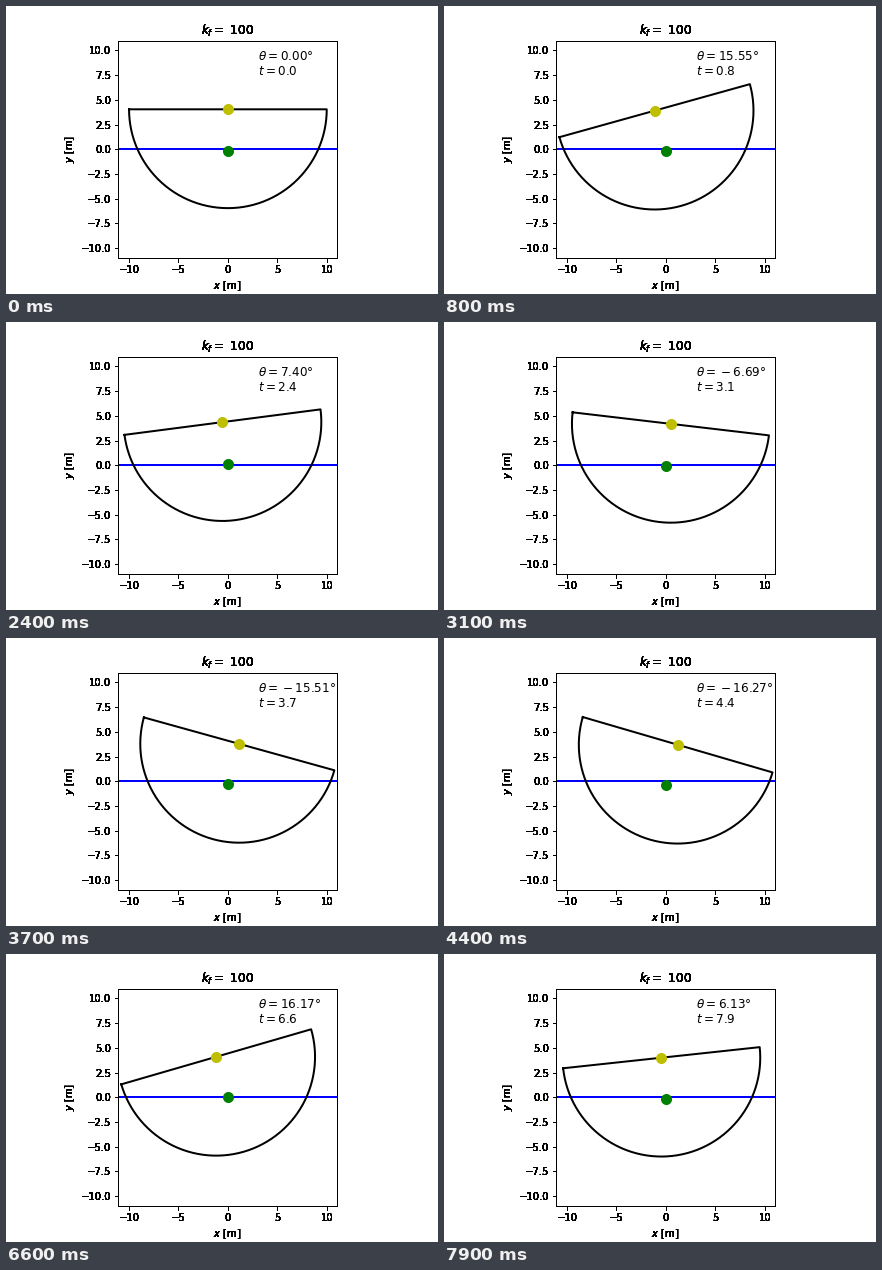
Animation of 432 by 288 pixels, one loop 8 s. Source, as a matplotlib script:

```python
import numpy as np
import matplotlib.pyplot as plt
from matplotlib.animation import FuncAnimation

# Half cylinder floating on water
R = 10.0                                   # radius
C = 4 * R / (3 * np.pi)                    # circle centre to centre of mass
G = 9.81
AREA = np.pi * R**2 / 2
INERTIA = R**2 / 2 - C**2                  # per unit mass
DENSITY = 0.5                              # relative to water
ROLL_DAMP, HEAVE_DAMP = 0.052, 0.03

FRAMES, DT, SUBSTEPS = 80, 0.1, 10


def lift(height):
    """Buoyancy per unit mass with the circle centre at this height."""
    wet = R**2 * np.arccos(height / R) - height * np.sqrt(R**2 - height**2)
    return G * wet / (DENSITY * AREA)


def rates(state):
    theta, omega, y, v = state
    force = lift(y + C * np.cos(theta))
    return np.array([
        omega,
        -force * C * np.sin(theta) / INERTIA - ROLL_DAMP * omega,
        v,
        force - G - HEAVE_DAMP * v,
    ])


def rk4(state, h):
    a = rates(state)
    b = rates(state + h / 2 * a)
    c = rates(state + h / 2 * b)
    d = rates(state + h * c)
    return state + h / 6 * (a + 2 * b + 2 * c + d)


def simulate():
    state = np.array([0.0, 0.4, -0.2, 0.0])
    states = [state]
    for _ in range(FRAMES - 1):
        for _ in range(SUBSTEPS):
            state = rk4(state, DT / SUBSTEPS)
        states.append(state)
    return states


def embolden(artist, passes=14):
    """Overprint an artist so its soft edges build up."""
    draw = artist.draw

    def overprint(renderer):
        for _ in range(passes):
            draw(renderer)

    artist.draw = overprint


states = simulate()
arc = np.linspace(np.pi, 2 * np.pi, 181)
hull_x = np.append(R * np.cos(arc), -R)
hull_y = np.append(R * np.sin(arc), 0)

plt.rcParams.update({"font.family": "DejaVu Sans", "font.size": 10,
                     "axes.linewidth": 1, "lines.linewidth": 2})
fig, ax = plt.subplots(figsize=(6, 4), dpi=72)
fig.subplots_adjust(left=0.125, right=0.9, bottom=0.125, top=0.88)
ax.set_aspect("equal")
ax.set(xlim=(-11.1, 11), ylim=(-11, 11), xlabel="$x$ [m]", ylabel="$y$ [m]")
ax.set_title("$k_f = $ 100")
for part in (ax.xaxis, ax.yaxis, ax.title):
    embolden(part)

ax.axhline(0, color="b")
hull, = ax.plot([], [], "k")
centre, = ax.plot([], [], "yo", ms=10)
mass, = ax.plot([], [], "go", ms=10)
angle_text = ax.text(3, 9, "", fontsize=12)
time_text = ax.text(3, 7.5, "", fontsize=12)


def update(i):
    theta, _, y, _ = states[i]
    s, c = np.sin(theta), np.cos(theta)
    cx, cy = -C * s, y + C * c
    hull.set_data(cx + hull_x * c - hull_y * s, cy + hull_x * s + hull_y * c)
    centre.set_data([cx], [cy])
    mass.set_data([0], [y])
    angle_text.set_text(rf"$\theta = {np.degrees(theta):.2f}$°")
    time_text.set_text(f"$t = {i * DT:.1f}$")
    return hull, centre, mass, angle_text, time_text


anim = FuncAnimation(fig, update, frames=FRAMES, interval=100, repeat=True,
                     repeat_delay=0, blit=False)
plt.show()
```
